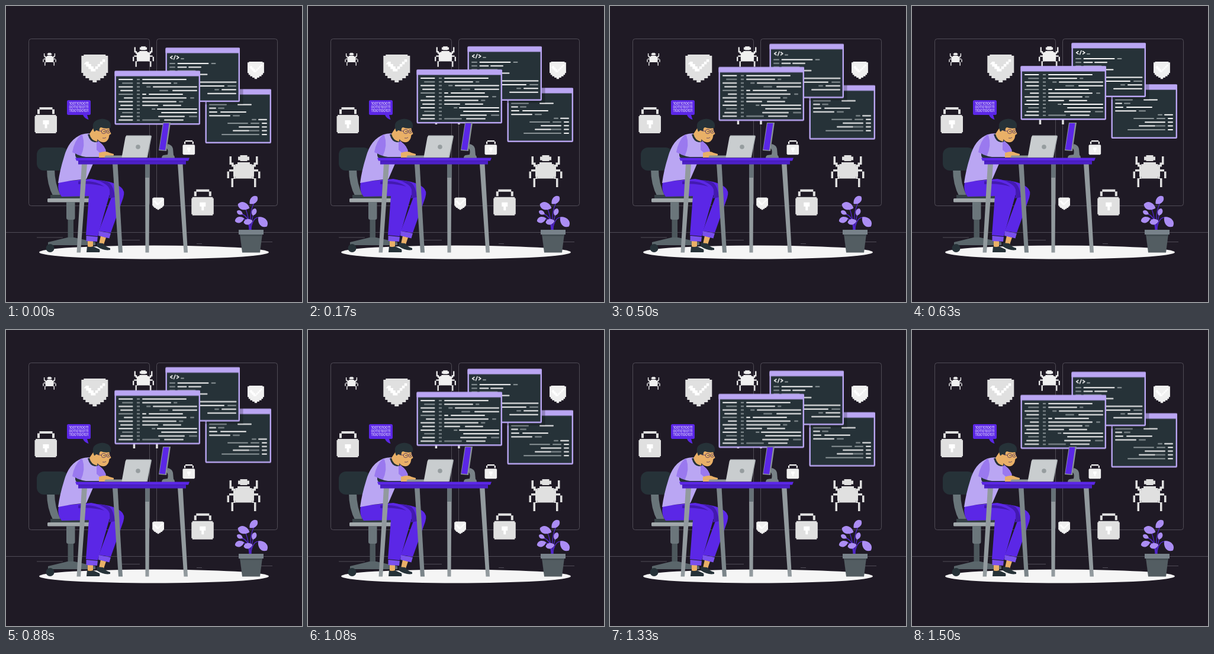
Recreate the animation shown at these times as an HTML page without scripts. Size 500 px wide and 500 px high, loop 1.54 s.

```html
<!DOCTYPE html>
<html lang="en">
<head>
<meta charset="utf-8">
<title>Code review</title>
<style>
  html, body { margin: 0; width: 100%; height: 100%; overflow: hidden; background: #1f1a25; }
  svg { display: block; width: 100vw; height: 100vh; }
  .line { fill: none; stroke: #5c5862; stroke-width: .8; }
  .dark { fill: #263238; }
  .lav { fill: #baa6f3; }
  .violet { fill: #5b27e6; }
  .deep { fill: #431ab0; }
  .skin { fill: #e9b067; }
  .pane { fill: #263238; stroke: #baa6f3; stroke-width: 2.4; }
  .code path { fill: none; stroke: #f7f7f7; stroke-width: 2; stroke-linecap: round; }
  .code .dim { stroke: #8b9497; }
  .bits { fill: #fff; font: 5.9px Inter, Arial, sans-serif; text-anchor: middle; }
  .pale { fill: #e0e0e0; }
  .bright { fill: #f0f0f0; }
  .float { animation: float 1540ms linear infinite; }
  @keyframes float {
    0% { transform: translateY(.1px); }
    47.7% { transform: translateY(-9.4px); }
    95.8% { transform: translateY(.5px); }
    100% { transform: translateY(.1px); }
  }
</style>
</head>
<body>
<svg viewBox="0 0 500 500">
  <defs>
    <g id="legs">
      <path d="M-24-25h3.500v10.500h3.500v3.500h3v3.500h-6.500v-3.500h-3.500z"/>
      <path d="M-17-3v3.500h-7.500v3.500h-3.500v-3.500h3.500v-3.500zM-28 4h3.500v8h-3.500z"/>
      <path d="M-17 8h3v5h-3.500v14h-3.500v-15h4z"/>
    </g>
    <g id="bug">
      <path d="M-6-27h12v2.500h3.500v6h-3.500v1.500h-12v-1.500h-3.500v-6h3.500z"/>
      <path d="M-10.500-15h21v3h3.500v3.500h3.500v17.500h-3.500v3.500h-28v-3.500h-3.500v-17.500h3.500v-3.500h3.500z"/>
      <use href="#legs"/>
      <use href="#legs" transform="scale(-1 1)"/>
    </g>
    <g id="lock">
      <path d="M8 0h22v3.500h3.500v8h-4v-7.500h-21v7.500h-4v-8h3.500z"/>
      <path d="M1.500 13h34.500v2h1.500v27h-1.500v2h-34.500v-2h-1.500v-27h1.500z"/>
      <path fill="#fff" d="M14 22h10v7h-3v6.500h-4v-6.500h-3z"/>
    </g>
    <g id="shield">
      <path d="M4 0h37v2h4v29h-3v5h-4v4h-6v3.500h-6v3.500h-7v-3.500h-6v-3.500h-6v-4h-4v-5h-3v-29h4z"/>
      <path fill="#fff" d="M8 12h4.500v4h4v4h4v4h3v-4h4v-4h4v-4h4v-4h4.500v4.500h-4v4h-4v4h-4v4h-4v4h-8v-4h-4v-4h-4v-4h-4z"/>
    </g>
    <path id="leaf" d="M-9 0C-6-8 4-7 9 0C4 7-6 8-9 0z"/>
    <clipPath id="rear"><rect x="336" y="140" width="112" height="92"/></clipPath>
  </defs>

  <rect width="500" height="500" fill="#1f1a25"/>
  <g class="line">
    <rect x="38.500" y="55.500" width="204" height="282" rx="4"/>
    <rect x="254.500" y="55.500" width="204" height="282" rx="4"/>
    <path d="M0 382.500H500M52 391H96M196 395.500H226M322 401.500H331M431 398.500H450"/>
  </g>
  <ellipse cx="250" cy="416" rx="194" ry="11.500" fill="#f5f5f5"/>

  <g class="pale">
    <use href="#bug" transform="translate(401.500 279)"/>
    <use href="#bug" transform="translate(235.700 173)"/>
    <use href="#lock" transform="translate(48.500 171)"/>
    <use href="#lock" transform="translate(313.300 309.700)"/>
    <use href="#shield" transform="translate(127.300 82)"/>
  </g>
  <g class="bright">
    <use href="#bug" transform="translate(232 85.500) scale(.64)"/>
    <use href="#bug" transform="translate(73.500 90) scale(.4)"/>
    <use href="#lock" transform="translate(298.500 227) scale(.55)"/>
    <use href="#shield" transform="translate(408 94) scale(.62)"/>
    <use href="#shield" transform="translate(247.200 323.500) scale(.44)"/>
  </g>

  <g class="float">
    <g class="code">
      <rect class="pane" x="337.700" y="141.700" width="109.100" height="89.100" rx="1"/>
      <rect class="lav" x="336.500" y="140.500" width="111.500" height="9" rx="1"/>
      <path d="M392 166.500h22M344 172.500h10M344 179h12M363 179h42M344 185.300h34M427 191.700h13M433 198h7M394 204.300h33M433 204.300h7M384 210.600h26M433 210.600h7M433 217h7"/>
      <path class="dim" d="M344 166.500h28M359 172.500h9M384 185.300h10M416 191.700h6M375 198h33M414 198h13M412 210.600h15M365 217h62"/>
      <rect x="275" y="75" width="125.500" height="91" fill="#000" opacity=".22" clip-path="url(#rear)"/>
    </g>
    <g class="code">
      <rect class="pane" x="270.700" y="71.700" width="123.100" height="89.100" rx="1"/>
      <rect class="lav" x="269.500" y="70.500" width="125.500" height="9" rx="1"/>
      <path stroke-linejoin="round" d="M281 84.500l-3.500 2.300 3.500 2.300M286 83.500l-2.500 6.500M288.500 84.500l3.500 2.300-3.500 2.300" style="stroke-width:1.500"/>
      <path d="M290.500 97h51M290.500 103.200h14M309 103.200h20M315 115.500h24.500M310 128.500h78.500M310 135h58M365 141.300h23M341 147.800h47"/>
      <path class="dim" d="M296 89h4M277 97h8M347.500 97h6M277 103.200h8M277 109.500h8M290.500 109.500h29M375 135h13M353 141.300h6"/>
    </g>
    <g class="code">
      <rect class="pane" x="184.700" y="110.700" width="142.100" height="88.600" rx="1"/>
      <rect class="lav" x="183.500" y="109.500" width="144.500" height="9" rx="1"/>
      <path d="M191 124h22.500M191 136.500h22.500M194 142.700h19.500M200 155.200h13.500M191 161.400h22.500M194 167.700h19.500M191 173.900h22.500M194 186.400h19.500M191 192.600h22.500"/>
      <path class="dim" d="M197 130.200h16.500M191 149h22.500M197 180.100h16.500"/>
      <path class="dim" d="M223.500 123V194" style="stroke-width:5;stroke-linecap:butt;stroke-dasharray:2 4.240"/>
      <path d="M231 124h73M231 130.200h47M249 136.500h73M282 142.700h40M231 149h5M242 149h56M231 155.200h73M231 161.400h56M231 167.700h25M266 167.700h29M256 173.900h66M263 180.100h59M258 186.400h43M268 192.600h31"/>
      <path class="dim" d="M284 130.200h4.500M238 136.500h5.500M260 142.700h13M312 155.200h5M293 161.400h5.500M247 173.900h4.500M310 186.400h12M231 192.600h28"/>
    </g>
  </g>

  <g id="bubble">
    <path class="violet" d="M105.500 159h35q2.500 0 2.500 2.500v20q0 2.500-2.500 2.500h-3.500l2.500 8q-7-2-9.500-8h-24.500q-2.500 0-2.500-2.500v-20q0-2.500 2.500-2.500z"/>
    <g class="bits">
      <text x="123" y="167.300">10011010011</text>
      <text x="123" y="173.300">00110100111</text>
      <text x="123" y="179.200">11001100101</text>
    </g>
  </g>

  <g id="chair">
    <path fill="#69757a" d="M69 275h13q0 25 11 47h-13q-11-20-11-47z"/>
    <rect class="dark" x="52" y="239" width="54" height="39" rx="12"/>
    <path fill="#374247" d="M75 319h70v7h-70z"/>
    <rect x="70" y="325" width="86" height="6.500" rx="1.500" fill="#a1a8ab"/>
    <path fill="#6b767b" d="M102 331h14.500v27q0 3-3 3h-8.500q-3 0-3-3z"/>
    <path fill="#4d585d" d="M104.500 361h9.500v31h-9.500z"/>
    <path fill="#5a666b" d="M104 391h11l36 8v5h-80v-5z"/>
    <circle class="dark" cx="74.500" cy="409" r="7"/>
  </g>

  <g id="person">
    <path class="skin" d="M160 388l9 3-4 12-8-1zM138 394h9v15h-9z"/>
    <path class="dark" d="M154 400l10 1q4 6 12 8v3q-11 2-23-6zM137 406q5 2 10 0l11 5q1 3 0 5h-22z"/>
    <path class="violet" d="M145 294q34 0 49 12 8 6 4 18l-21 59-20-3 21-57z"/>
    <path class="deep" d="M150 295q22 4 25 15 1 7-1 15l10-2q-2-18-9-24-10-6-25-4z"/>
    <path class="violet" d="M89 297l55-5q33 5 30 30l-19 67-20-2 5-66-46 1q-8-9-5-25z"/>
    <path fill="#7a50ee" d="M135.500 388l19.500 2-1 8-18.500-1zM157 380l20 4-2.500 8.500-18.500-4.500z"/>
    <path class="deep" d="M122 296q30-2 44 9-20-6-44-4z"/>
    <path class="lav" d="M128 217q9-3 17-1l13 14q9 6 11 17l-20 15-13 30q-24 2-48 7 3-22 10-44 8-30 30-38z"/>
    <path fill="#9a79ef" d="M127 217q-12 11-15 30l14 7q9-18 3-36z"/>
    <path fill="#9a79ef" d="M153 227q11 5 16 17l-7 7-9-8z"/>
    <path class="dark" d="M117 249q6 4 18 6h24v6q-18 3-35-2-8-2-7-10z"/>
    <path class="skin" d="M157 248q12-4 18 0l7 2q1 4-5 4l-5 2h-15z"/>
    <path class="dark" d="M138 217q7-3 14 5l4 7q-13 5-18-12z"/>
    <path class="skin" d="M141 216l8-12 24-3 2 8 2.500 7-3 2q-1 10-8 12-8 1-12-5l-1 4q-10-2-12.500-13z"/>
    <path class="dark" d="M149 212q-6-14 4-19 10-5 19 0 7 4 4.500 13-9 2-16-1-3 0-3 6l-4 2z"/>
    <circle class="skin" cx="153.500" cy="213.500" r="3.500"/>
    <g fill="none" stroke="#38235d" stroke-width=".7">
      <circle cx="165" cy="212" r="3.700"/>
      <circle cx="172.700" cy="212" r="3"/>
      <path d="M154 210.500l7.300 1M163 223q4 1 6-1"/>
    </g>
    <path class="dark" d="M165 211.300h1.300v1.700h-1.300zM172 211.300h1.300v1.700h-1.300z"/>
  </g>

  <g id="monitor">
    <path fill="#788287" d="M273 233q8 2 9 8l1 11q2 1 2 5h-22q0-4 3-5l7-1q2-8-2-11z"/>
    <path fill="#8b9498" d="M265 197h13l-7 48-13-1z"/>
    <path class="violet" d="M266 198h9.500l-6.500 45.500-10-1z"/>
  </g>
  <g id="laptop">
    <path fill="#8d9599" d="M168 252.500h69v4h-71z"/>
    <path fill="#a3aaad" d="M203 218.500h41q2 0 2 2l-7 35.500h-43z"/>
    <path fill="#c9cdcf" d="M204 219.500h39q2 0 1.500 2l-7 34h-42l6-33q.5-3 2.500-3z"/>
    <circle cx="223" cy="238" r="3.800" fill="#969d9f"/>
  </g>
  <g id="desk">
    <path fill="#7b858a" d="M180 266h8.500l8.500 150.500h-7z"/>
    <path fill="#929a9e" d="M128 266h9l-11 150.500h-6.500zM235 266h7.500l-1 150.500h-6zM290 266h8.500l8.500 150.500h-6.500z"/>
    <path fill="#667177" d="M235 266h7.500v24h-7.500z"/>
    <path fill="#4c20c6" d="M122 261h182v6.500h-182z"/>
    <path class="violet" d="M117 256.500h193l-2 5h-189z"/>
    <path class="deep" d="M122 261h182v1.200h-182z"/>
  </g>

  <g id="plant">
    <path fill="none" stroke="#5025ca" stroke-width="1.300" d="M412 379q-2-22-7-36M413 379q-2-32 6-46M413 379q4-25 16-21M411 379q0-19-12-20M412 379q0-24-15-28M414 379q0-20 5-28"/>
    <g fill="#ab8df4">
      <use href="#leaf" transform="translate(401.500 338) rotate(18) scale(1.150)"/>
      <use href="#leaf" transform="translate(418 328) rotate(135)"/>
      <use href="#leaf" transform="translate(433.500 364.500) rotate(228) scale(1.200)"/>
      <use href="#leaf" transform="translate(394.500 361) rotate(-18) scale(.9)"/>
      <use href="#leaf" transform="translate(395 349) rotate(30) scale(.62)"/>
      <use href="#leaf" transform="translate(409 364.500) rotate(-12) scale(.85)"/>
      <use href="#leaf" transform="translate(419 348) rotate(110) scale(.72)"/>
    </g>
    <path fill="#535d62" d="M395 385h38l-4 31.500h-30z"/>
    <path fill="#434d52" d="M395 385.500h38l-.5 3h-37z"/>
    <path fill="#78828a" d="M393 378h42v8h-42z"/>
  </g>
</svg>
</body>
</html>
```
